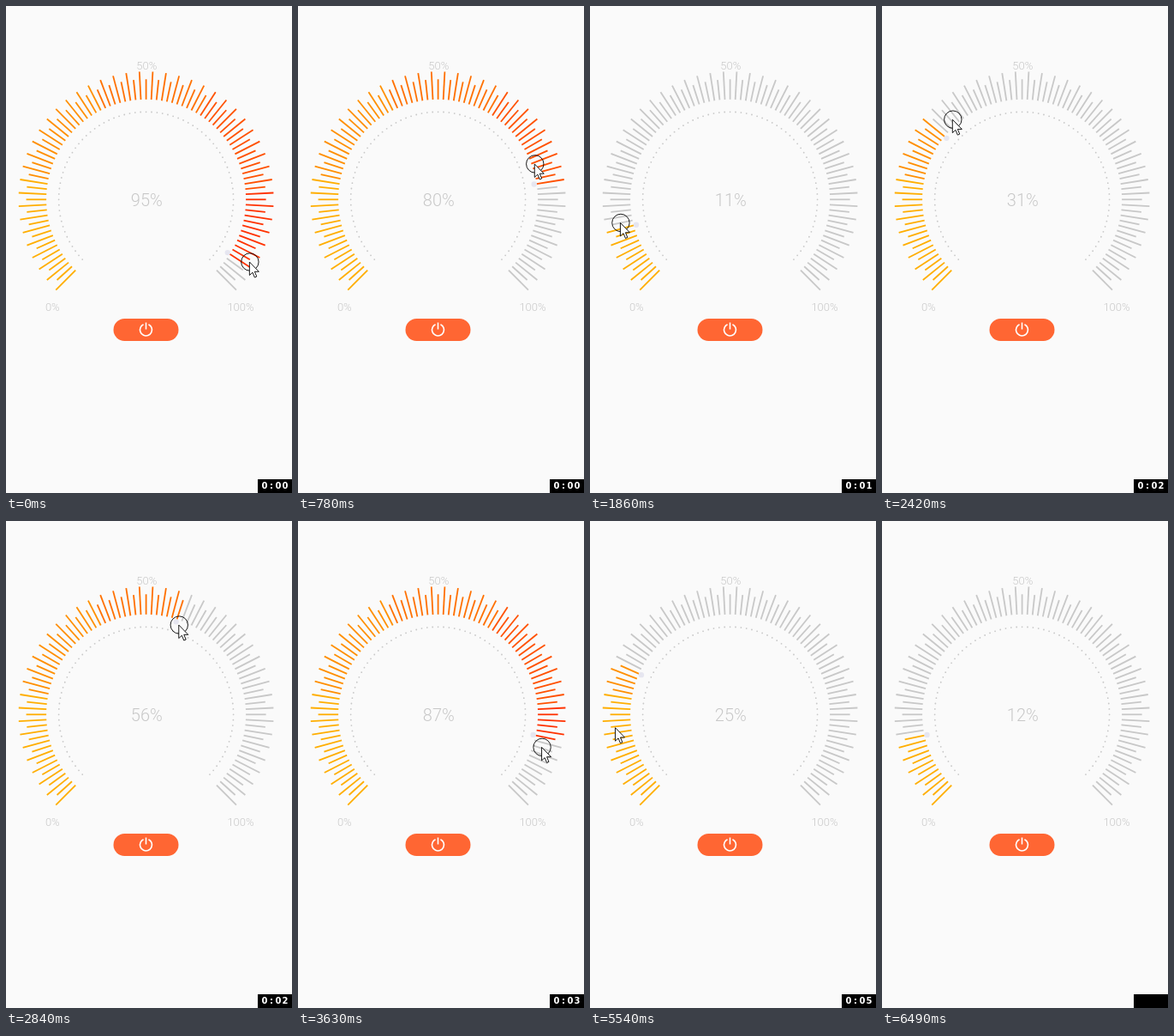
Write an HTML page with a canvas that moves like this. It is 334 px wide and 567 px high and loops after 7000 ms.

```html
<!DOCTYPE html>
<html lang="en">
<head>
<meta charset="utf-8">
<title>Radial gauge</title>
<style>
html, body { margin: 0; height: 100%; overflow: hidden; background: #fafafa; }
canvas { display: block; }
</style>
</head>
<body>
<canvas id="stage" width="334" height="567"></canvas>
<script>
const ctx = document.getElementById('stage').getContext('2d');
const LOOP = 7000, TICKS = 90, LAG = 70, CX = 163.6, CY = 225.3, GREY = '#c8c8c8';

// Pointer path around the dial: time, degrees from the top, radius
const PATH = [
  [0, 121, 141], [300, 135, 128], [780, 70, 120], [1390, -39, 137], [1780, -106, 134],
  [1860, -102, 131], [2110, -92, 134], [2770, 16, 112], [2840, 20, 111], [3690, 114, 128],
  [3990, 69, 130], [4360, 45, 138], [4510, -16, 124], [4660, -16, 124], [5200, -67, 130],
  [5540, -96.5, 135], [5690, -102, 135], [6000, -102, 135], [6340, -179, 315]
];
const PRESSES = [[0, 4360], [4660, 5270], [5690, 5700]];

const rad = deg => deg * Math.PI / 180;
const mix = (a, b, k) => a + (b - a) * k;
const tickAngle = i => i * 3 - 135;
const polar = (deg, r) => [CX + r * Math.sin(rad(deg)), CY - r * Math.cos(rad(deg))];

function pathAt(t) {
  const next = PATH.findIndex(key => key[0] > t);
  if (next < 0) return PATH.at(-1).slice(1);
  const a = PATH[next - 1], b = PATH[next], k = (t - a[0]) / (b[0] - a[0]);
  return [mix(a[1], b[1], k), mix(a[2], b[2], k)];
}

// The dial trails the pressed pointer and keeps its value after release.
function litAt(t) {
  const [start, end] = PRESSES.findLast(press => press[0] <= t);
  const [angle] = pathAt(Math.max(start, Math.min(t, end) - LAG));
  return Math.min(TICKS, Math.ceil((angle + 135) / 3));
}

function line(from, to, color, width) {
  ctx.strokeStyle = color;
  ctx.lineWidth = width;
  ctx.beginPath();
  ctx.moveTo(...from);
  ctx.lineTo(...to);
  ctx.stroke();
}

function disc([x, y], r, color) {
  ctx.fillStyle = color;
  ctx.beginPath();
  ctx.arc(x, y, r, 0, 7);
  ctx.fill();
}

function label(text, x, y, font, color = GREY) {
  ctx.font = font;
  ctx.fillStyle = color;
  ctx.fillText(text, x, y);
}

function drawDial(lit) {
  for (let i = 0; i <= TICKS; i++) {
    const a = tickAngle(i), band = Math.floor(i / 18.5);
    const color = i > lit ? GREY : `hsl(${41 - 7.3 * band} 100% 50%)`;
    line(polar(a, 116.5), polar(a, i % 2 ? 140 : 149), color, 1.8);
  }
  for (let i = -37; i <= 37; i++) disc(polar(i * 3.6, 102), 0.9, GREY);
  disc(polar(tickAngle(lit), 113.5), 3.2, '#e6e6f0');

  const small = '300 13px Roboto, sans-serif';
  label('0%', 54.3, 355, small);
  label('50%', 164.3, 74, small);
  label('100%', 274, 355, small);
  label(Math.floor(lit / TICKS * 100) + '%', 164.3, 232.5, '300 20px Roboto, sans-serif');
}

function drawButton() {
  ctx.fillStyle = '#ff6633';
  ctx.beginPath();
  ctx.roundRect(125.5, 364, 76, 26, 13);
  ctx.fill();
  line([163.5, 368.5], [163.5, 376.5], '#fff', 1.6);
  ctx.beginPath();
  ctx.arc(163.5, 377, 7, rad(-65), rad(245));
  ctx.stroke();
}

function drawPointer([x, y], pressed) {
  ctx.save();
  ctx.translate(x, y);
  ctx.strokeStyle = '#000';
  ctx.lineWidth = 0.9;
  if (pressed) {
    ctx.beginPath();
    ctx.arc(0.5, 0, 10.2, 0, 7);
    ctx.stroke();
  }
  const arrow = new Path2D('M0 0V15.5L3.6 12.2L6 18L8.4 17L6 11.3H11Z');
  ctx.fillStyle = '#fff';
  ctx.fill(arrow);
  ctx.stroke(arrow);
  ctx.restore();
}

function drawClock(t) {
  ctx.fillStyle = '#000';
  ctx.fillRect(294, 551, 40, 16);
  if (t >= 6490) return;
  [...'0:0' + Math.floor(t / 1000)].forEach((char, i) =>
    label(char, 302 + i * 8, 562, 'bold 10px "DejaVu Sans", sans-serif', '#fff'));
}

function draw(now) {
  const t = now % LOOP;
  const pressed = PRESSES.some(([start, end]) => t >= start && t < end);
  ctx.fillStyle = '#fafafa';
  ctx.fillRect(0, 0, 334, 567);
  ctx.textAlign = 'center';
  drawDial(litAt(t));
  drawButton();
  if (t < 6340) drawPointer(polar(...pathAt(t)), pressed);
  drawClock(t);
  requestAnimationFrame(draw);
}
requestAnimationFrame(draw);
</script>
</body>
</html>
```
